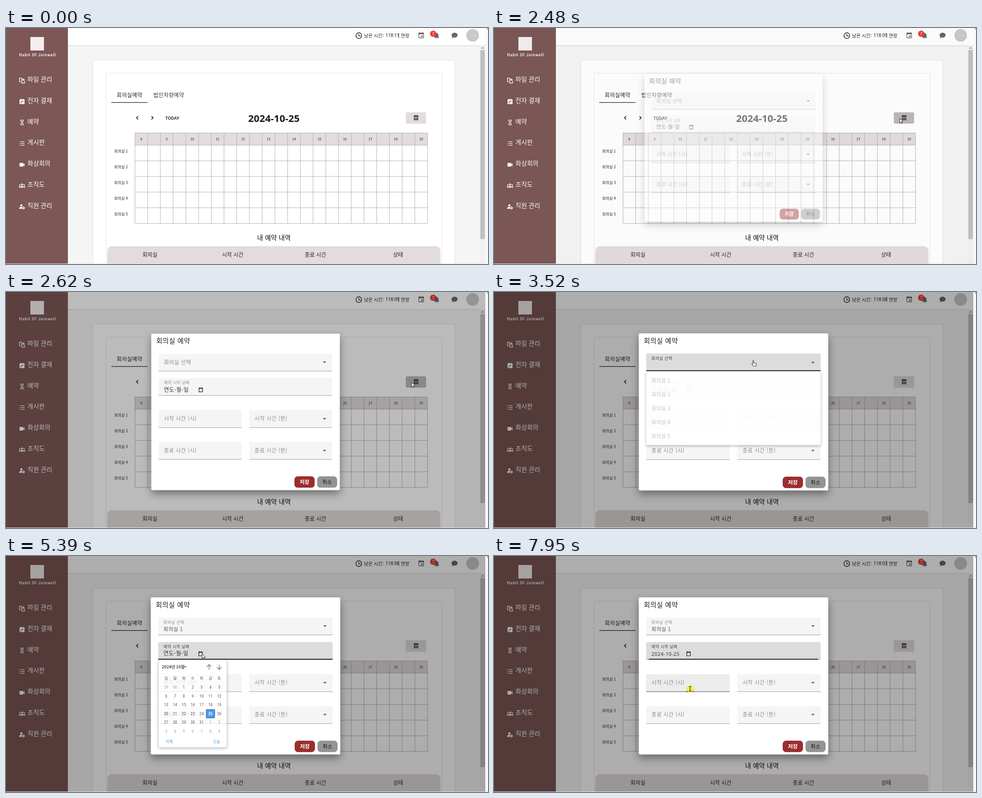
An HTML page for the animation above (8000 ms loop, 1067x525 px).

```html
<!DOCTYPE html>
<html lang="ko">
<head>
<meta charset="utf-8">
<title>회의실 예약</title>
<style>
  html, body { margin: 0; width: 100%; height: 100%; overflow: hidden; background: #f5f5f5; }
  svg { display: block; width: 1067px; height: 525px; }
  text { font-family: "Noto Sans CJK KR", "Noto Sans KR", "Noto Sans CJK", sans-serif; white-space: pre; }
  .latin { font-family: Roboto, sans-serif; }
  .date { font-family: "Noto Sans", sans-serif; }
</style>
</head>
<body>
<svg viewBox="0 0 1067 525"><g id="page"></g><g id="live"></g></svg>
<script>
const LOOP = 8000;
const clamp = v => Math.max(0, Math.min(1, v));
const ramp = (t, a, b) => clamp((t - a) / (b - a));
const smooth = u => u * u * (3 - 2 * u);
const within = (p, x, y, w, h) => p.x >= x && p.x < x + w && p.y >= y && p.y < y + h;
const range = n => [...Array(n).keys()];

const rect = (x, y, w, h, fill, extra = '') =>
  `<rect x="${x}" y="${y}" width="${w}" height="${h}" fill="${fill}" ${extra}/>`;
const path = (d, extra) => `<path d="${d}" ${extra}/>`;
const text = (x, y, size, str, fill = '#222', extra = '') =>
  `<text x="${x}" y="${y}" font-size="${size}" fill="${fill}" ${extra}>${str}</text>`;
const circle = (x, y, r, fill, extra = '') => `<circle cx="${x}" cy="${y}" r="${r}" fill="${fill}" ${extra}/>`;
const place = (x, y, s, body) => `<g transform="translate(${x} ${y}) scale(${s})">${body}</g>`;
const line = (d, color, width = 1, extra = '') =>
  path(d, `fill="none" stroke="${color}" stroke-width="${width}" ${extra}`);
const MID = 'text-anchor="middle"';
const BOLD = 'font-weight="700"';
const SPACED = 'letter-spacing=".35"';
const shadow = (y, blur, a) => `style="filter:drop-shadow(0 ${y}px ${blur}px rgba(0,0,0,${a}))"`;

// ---------- page behind the dialog ----------
const menu = [
  ['파일 관리', line('M4 10H1V2h4l1 2h5v2M6 6h3l3 3v4H6z', '#fff', 1.4)],
  ['전자 결재', rect(1, 2, 11, 11, '#fff', 'rx="1.5"') + line('M3.5 10.5L9 5', '#7c5756', 1.7)],
  ['예약', line('M3 1.7h7M3 12.3h7M4 2v2.5L6.5 7 4 9.5V12M9 2v2.5L6.5 7 9 9.5V12', '#fff', 1.3)],
  ['게시판', line('M1 3h1.6M1 7h1.6M1 11h1.6M4 3h8M4 7h8M4 11h8', '#fff', 1.4)],
  ['화상회의', path('M1 3.5h8v3l3-2.5v7L9 8.500v3H1z', 'fill="#fff"')],
  ['조직도', circle(6.5, 4.5, 2, '#fff') + circle(2, 5.5, 1.4, '#fff') + circle(11, 5.5, 1.4, '#fff') +
    path('M3 11.500c0-5 7-5 7 0zM-.5 11.500c0-3 1-4 3-3.700l-.5 3.700zM13.500 11.500c0-3-1-4-3-3.700l.5 3.700z', 'fill="#fff"')],
  ['직원 관리', circle(5, 4.5, 2.5, '#fff') + path('M0 12c0-4 4-4.600 6.500-4v4z', 'fill="#fff"') +
    circle(9.7, 10, 1.9, 'none', 'stroke="#fff" stroke-width="1.500"') +
    line('M9.700 6.800v1M9.700 12.200v1M6.500 10h1M12 10h1', '#fff', 1.4)]
];

function sidebar() {
  return rect(0, 0, 137, 525, '#7c5756') +
    rect(54, 20, 30, 30, '#f5eeee') +
    text(70, 62.5, 8.6, 'Habit Of Joinwell', '#f5eeee', `${MID} ${BOLD} class="latin" letter-spacing=".9"`) +
    menu.map(([label, icon], i) => {
      const y = 119 + i * 46.8;
      return place(29, y - 9.5, 1, icon) + text(47.5, y, 13.8, label, '#fff', 'font-weight="500"');
    }).join('');
}

function header() {
  const grey = 'fill="#686868"';
  return rect(137, 38, 924, 3, '#dedede') + rect(137, 40, 924, 490, '#f5f5f5', 'rx="7"') +
    rect(137, 0, 924, 38.5, '#fff') +
    circle(781, 17, 6.4, 'none', 'stroke="#222" stroke-width="1.500"') + line('M781 13v4.500h4', '#222', 1.3) +
    text(792.5, 20.5, 10.3, '남은 시간:') + text(874, 20.5, 10.3, '연장') +
    place(911, 8.6, .67, path('M17 12h-5v5h5zM16 1v2H8V1H6v2H5q-2 0-2 2v14q0 2 2 2h14q2 0 2-2V5q0-2-2-2h-1V1zM19 19H5V8h14z', grey)) +
    place(945, 8.6, .69, path('M12 22q2 0 2-2h-4q0 2 2 2zM18 16v-5c0-3-1.600-5.600-4.500-6.300V4a1.500 1.500 0 0 0-3 0v.7C7.600 5.400 6 8 6 11v5l-2 2v1h16v-1z', grey)) +
    place(985, 8.6, .67, path('M12 3c5.500 0 10 3.600 10 8s-4.500 8-10 8q-2 0-3.500-.5Q6 21 2 21q2.500-2.500 2.700-4.500Q2 14 2 11c0-4.400 4.500-8 10-8z', grey)) +
    circle(945.6, 12.8, 7, '#ee4035') + text(945.6, 15.8, 8.5, 7, '#fff', `${MID} class="latin"`) +
    circle(1033, 16.5, 14, '#c8c8c8') + text(1033, 18, 4, 'no img', '#e6e6e6', MID);
}

function schedule() {
  const x0 = 285.5, colW = 28.16, top = 233.5, rowTop = 260.5, rowH = 34.85, w = colW * 23;
  const bottom = rowTop + rowH * 5;
  const cols = range(24).map(i => `M${x0 + i * colW} ${top}V${bottom}`).join('');
  const rows = range(6).map(i => `M${x0} ${rowTop + i * rowH}h${w}`).join('');
  return rect(x0, top, w, 27, '#e3dcdc') +
    line(`M${x0} ${top}h${w}${cols}${rows}`, '#b3b0b0') +
    range(12).map(i => text(x0 + colW * (2 * i + .5), 250, 7.5, 8 + i, '#222', MID)).join('') +
    range(5).map(i => text(239.5, 277.3 + i * rowH, 8.4, `회의실 ${i + 1}`)).join('');
}

function card() {
  const heads = ['회의실', '시작 시간', '종료 시간', '상태'];
  return rect(193, 72, 800, 470, '#fff', `rx="6" ${shadow(0, 1.5, .14)}`) +
    line('M221.500 525V100.500H965V525', '#e9e4da') +
    text(245, 153.5, 12, '회의실예약', '#222', SPACED) + text(326, 153.5, 12, '법인차량예약', '#333', SPACED) +
    rect(233, 165, 80.500, 1.3, '#222') +
    line('M292.500 196l-3.700 3.700 3.700 3.700M322 196l3.700 3.700-3.700 3.700', '#111', 1.6) +
    text(352.5, 204, 9.9, 'TODAY', '#111', 'class="latin" font-weight="500"') +
    text(593, 209, 21.8, '2024-10-25', '#1c1c1c', `${MID} class="date" font-weight="600"`) +
    schedule() +
    text(593, 472, 14.4, '내 예약 내역', '#111', `${MID} font-weight="500"`) +
    rect(224, 485.5, 738, 60, '#e3dcdc', 'rx="11"') +
    heads.map((h, i) => text(318.5 + i * 183.2, 509, 12, h, '#222', `${MID} font-weight="500"`)).join('');
}

function scrollbar() {
  return rect(1049.5, 39, 11.5, 486, '#f1f1f1') + path('M1052 45.500h6l-3-3z', 'fill="#777"') +
    rect(1050, 49, 10, 420.5, '#c1c1c1');
}

// ---------- timing ----------
const OPEN = 2430, SELECT = 3400, PICK = 3850, FOCUS_DATE = 4960, CAL_OPEN = 5300, CAL_CLOSE = 7290, NEXT = 7900;
const clicks = [[2340, 2420], [3360, 3440], [3830, 3900], [4940, 5030], [5250, 5330], [7090, 7130], [7890, LOOP]];
const route = [
  [440, 1062, 500], [840, 700, 330], [1230, 425, 225], [1500, 357, 205], [1700, 420, 225], [2080, 904, 222],
  [2200, 898, 201], [2900, 898, 201], [2990, 870, 195], [3330, 574, 153], [3560, 574, 153], [3730, 540, 195],
  [3890, 540, 195], [4400, 486, 206], [4770, 486, 206], [4940, 434, 218], [6070, 434, 218], [6180, 466, 300],
  [6250, 473, 342], [6500, 456, 354], [7300, 456, 354], [7760, 434, 295.5]
];

function pointerAt(t) {
  const i = route.findIndex(k => k[0] > t);
  if (i < 0) return { x: route.at(-1)[1], y: route.at(-1)[2] };
  if (i === 0) return { x: -50, y: -50 };
  const [t0, x0, y0] = route[i - 1], [t1, x1, y1] = route[i];
  const u = ramp(t, t0, t1);
  return { x: x0 + (x1 - x0) * u, y: y0 + (y1 - y0) * u };
}

const clockText = t => '118:' + String(11 - (t < 835 ? 0 : 1 + Math.floor((t - 835) / 1015))).padStart(2, '0');

// ---------- dialog ----------
const arrow = (x, y, up) => path(`M${x - 4} ${y + (up ? 2 : -2)}h8l-4 ${up ? -4 : 4}z`, 'fill="#666"');

function box(x, y, w, { hover, focus, grow = 0, from = x + w / 2 }) {
  const fill = focus ? '#dcdcdc' : hover ? '#ececec' : '#f5f5f5';
  const left = from - (from - x) * grow;
  return path(`M${x} ${y + 39.3}v-36q0-3 3-3h${w - 6}q3 0 3 3v36z`, `fill="${fill}"`) +
    rect(x, y + 38.5, w, 1, hover ? '#444' : '#9a9a9a') +
    (grow ? rect(left, y + 37.7, w * grow, 1.8, '#111') : '');
}

function selectField(t, p) {
  const focus = t >= SELECT && t < FOCUS_DATE, u = smooth(ramp(t, SELECT, SELECT + 110));
  const open = t >= SELECT && t < PICK;
  return box(337, 136.5, 386, { hover: within(p, 337, 136, 386, 40) && t > 3000, focus,
      grow: focus ? ramp(t, SELECT, SELECT + 110) : 0 }) +
    text(348.5, 160.3 - 9.700 * u, 12 - 3 * u, '회의실 선택', focus ? '#444' : '#8c8c8c', SPACED) +
    (t >= PICK ? text(348.5, 166.8, 11.6, '회의실 1', '#555', 'letter-spacing=".25"') : '') +
    arrow(706, 156, open);
}

function dateField(t, p) {
  const focus = t >= FOCUS_DATE;
  const grow = focus ? ramp(t, FOCUS_DATE, FOCUS_DATE + 120) - .03 * ramp(t, NEXT, 7950) : 0;
  return box(337, 191, 386, { hover: within(p, 337, 191, 386, 39) && t > 3000, focus, grow }) +
    text(348.5, 205, 9, '예약 시작 날짜', focus ? '#444' : '#8c8c8c', SPACED) +
    (t < CAL_CLOSE ? text(348.5, 221.3, 12.2, '연도-월-일', '#333', SPACED)
                   : text(348.5, 221.7, 11.2, '2024-10-25', '#333', 'class="date" letter-spacing=".4"')) +
    line('M426.700 214.500h8v7.500h-8z', '#111', 1.2) + line('M426.200 214h9M428.500 212v2M433 212v2', '#111', 1.5);
}

function timeField(label, x, y, t, p, grow) {
  const calendarUp = t >= CAL_OPEN && t < CAL_CLOSE + 80;
  const hover = t > 4000 && !calendarUp && within(p, x, y, 184.5, 39);
  return box(x, y, 184.5, { hover, grow, from: 434.5 }) +
    text(x + 11.5, y + 23.500, 12, label, '#8c8c8c', SPACED) + (x > 500 ? arrow(706, y + 19.5) : '');
}

function optionPanel(t, p) {
  const shown = ramp(t, SELECT - 10, SELECT + 130) * (1 - ramp(t, PICK + 10, PICK + 130));
  if (!shown) return '';
  const options = range(5).map(i => {
    const y = 181 + i * 31;
    const hover = t > 3560 && within(p, 337, y, 386, 31);
    return (hover ? rect(337, y, 386, 31, '#ededed') : '') +
      text(348.5, y + 19.800, 11.6, `회의실 ${i + 1}`, '#222', `opacity="${ramp(t, 3490, 3600)}"`);
  }).join('');
  return `<g opacity="${shown}">${rect(337, 176.5, 386, 164, '#fff', `rx="2" ${shadow(2, 3, .3)}`)}${options}</g>`;
}

function calendar(t, p) {
  const shown = ramp(t, CAL_OPEN, CAL_OPEN + 120) * (1 - ramp(t, CAL_CLOSE, CAL_CLOSE + 90));
  if (!shown) return '';
  const step = 19.6, cx = i => 354.5 + step * i;
  const column = Math.floor((p.x - 344.7) / step), row = Math.floor((p.y - 284) / step);
  const hovered = column >= 0 && column < 7 && row >= 0 && row < 6 ? row * 7 + column : -1;
  const days = range(42).map(i => {
    const offset = i - 1, current = offset >= 1 && offset <= 31;
    const day = offset < 1 ? offset + 30 : current ? offset : offset - 31;
    const x = cx(i % 7), y = 292 + step * Math.floor(i / 7), today = offset === 25;
    const cell = today || i === hovered
      ? rect(x - 9.3, y - 9.3, 18.8, 18.8, today ? '#0a80f5' : '#b3d3f8', `rx="1" stroke="${today ? '#123' : '#456'}"`) : '';
    return cell + text(x, y + 3, 8.4, day, today ? '#fff' : current ? '#222' : '#858585', `${MID} class="latin" ${today ? BOLD : ''}`);
  }).join('');
  return `<g opacity="${shown}">` +
    rect(337.5, 231, 151.5, 195, '#fff', `rx="4" stroke="#bbb" stroke-width=".6" ${shadow(2, 3.5, .35)}`) +
    text(345, 250, 8.9, '2024년 10월', '#111', BOLD) + path('M394.500 245.300h5.400l-2.700 3z', 'fill="#111"') +
    line('M449.500 252.500V241.500M444.500 246.500l5-5 5 5M472 241.500v11M467 247.500l5 5 5-5', '#333', 1.2) +
    [...'일월화수목금토'].map((d, i) => text(cx(i), 274.8, 8.3, d, '#222', MID)).join('') + days +
    text(361, 415.5, 8.800, '삭제', '#1585dc', MID) + text(466, 415.5, 8.800, '오늘', '#1585dc', MID) + '</g>';
}

function dialog(t, p) {
  if (t < OPEN) return '';
  const scale = 1 - .1 * (1 - ramp(t, OPEN, 2700)) ** 2.45;
  const next = t > NEXT ? .082 * ramp(t, NEXT, 7950) : 0;
  return rect(0, 0, 1061, 525, '#000', `opacity="${.32 * smooth(ramp(t, 2450, 2680))}"`) +
    `<g opacity="${ramp(t, OPEN, 2550)}" transform="translate(530 266.700) scale(${scale}) translate(-530 -266.700)">` +
    rect(320.5, 92, 419.5, 349.5, '#fff', `rx="3" ${shadow(8, 9, .4)}`) +
    text(331.5, 113.5, 15, '회의실 예약', '#222', 'letter-spacing=".4"') +
    selectField(t, p) + dateField(t, p) +
    timeField('시작 시간 (시)', 337, 262.800, t, p, next) + timeField('시작 시간 (분)', 538.7, 262.800, t, p) +
    timeField('종료 시간 (시)', 337, 333.800, t, p) + timeField('종료 시간 (분)', 538.7, 333.800, t, p) +
    rect(639, 410.7, 45, 25.5, '#9b2d2d', 'rx="7.500"') + text(661.5, 427.5, 11.8, '저장', '#fff', `${MID} ${BOLD}`) +
    rect(689.5, 410.7, 44.5, 25.5, '#949494', 'rx="7.500"') + text(711.7, 427.5, 11.8, '취소', '#111', `${MID} font-weight="500"`) +
    optionPanel(t, p) + calendar(t, p) + '</g>';
}

// ---------- pointer ----------
function pointer(t, p) {
  if (t < 440) return '';
  const ink = 'fill="#fff" stroke="#111" stroke-width=".9" stroke-linejoin="round"';
  const onSelect = t > 3000 && t < PICK + 80 && within(p, 337, 136, 386, 204);
  const onInput = t > CAL_CLOSE + 60 && (within(p, 337, 263, 184, 39) || within(p, 337, 334, 184, 39));
  const shape = onInput ? line('M-3-5h2.500L0-4.500.5-5H3M-3 5h2.500L0 4.500.5 5H3M0-4.500v9', '#222', 1.2)
    : onSelect ? path('M-1 0q1-1 2 0v4.500l5 1.200q1.200.5 1 2L6 12H0L-3 8q-1-1.500.3-1.500L-1 7.800z', ink)
    : path('M0 0v10.200l2.400-2.200 1.700 3.700 1.800-.8-1.700-3.600h3.200z', ink);
  const pressed = clicks.some(([a, b]) => t >= a && t < b);
  return (pressed ? circle(p.x, p.y, 8.3, '#f7ee20', 'opacity=".8"') : '') + place(p.x, p.y, 1, shape);
}

function addButton(t, p) {
  const hover = t < 2900 && within(p, 885, 187, 45, 26);
  return rect(885, 187.5, 45, 25.3, hover ? '#bdb8b8' : '#e3dcdc', 'rx="3"') +
    line('M903.700 196h8v8h-8zM907.700 198.500v4M905.700 200.500h4', '#111', 1.3) + line('M903 195.800h9.400M905.500 193.800v2M910 193.800v2', '#111', 1.7);
}

const frameEdges = rect(1061, 0, 6, 525, '#f8f8f8') + path('M1064 3l3-3v3z', 'fill="#777"') +
  rect(0, 524, 1067, 1, '#e9e6e6');

function scene(t) {
  const p = pointerAt(t);
  return text(840, 20.3, 10.2, clockText(t), '#222', 'class="latin"') + rect(868.800, 11, 1, 11, '#444') +
    addButton(t, p) + dialog(t, p) + frameEdges + pointer(t, p);
}

const live = document.getElementById('live');
document.getElementById('page').innerHTML =
  rect(0, 0, 1067, 525, '#f5f5f5') + header() + card() + scrollbar() + sidebar();

const start = performance.now();
function draw() {
  live.innerHTML = scene((performance.now() - start) % LOOP);
  requestAnimationFrame(draw);
}
draw();
</script>
</body>
</html>
```
